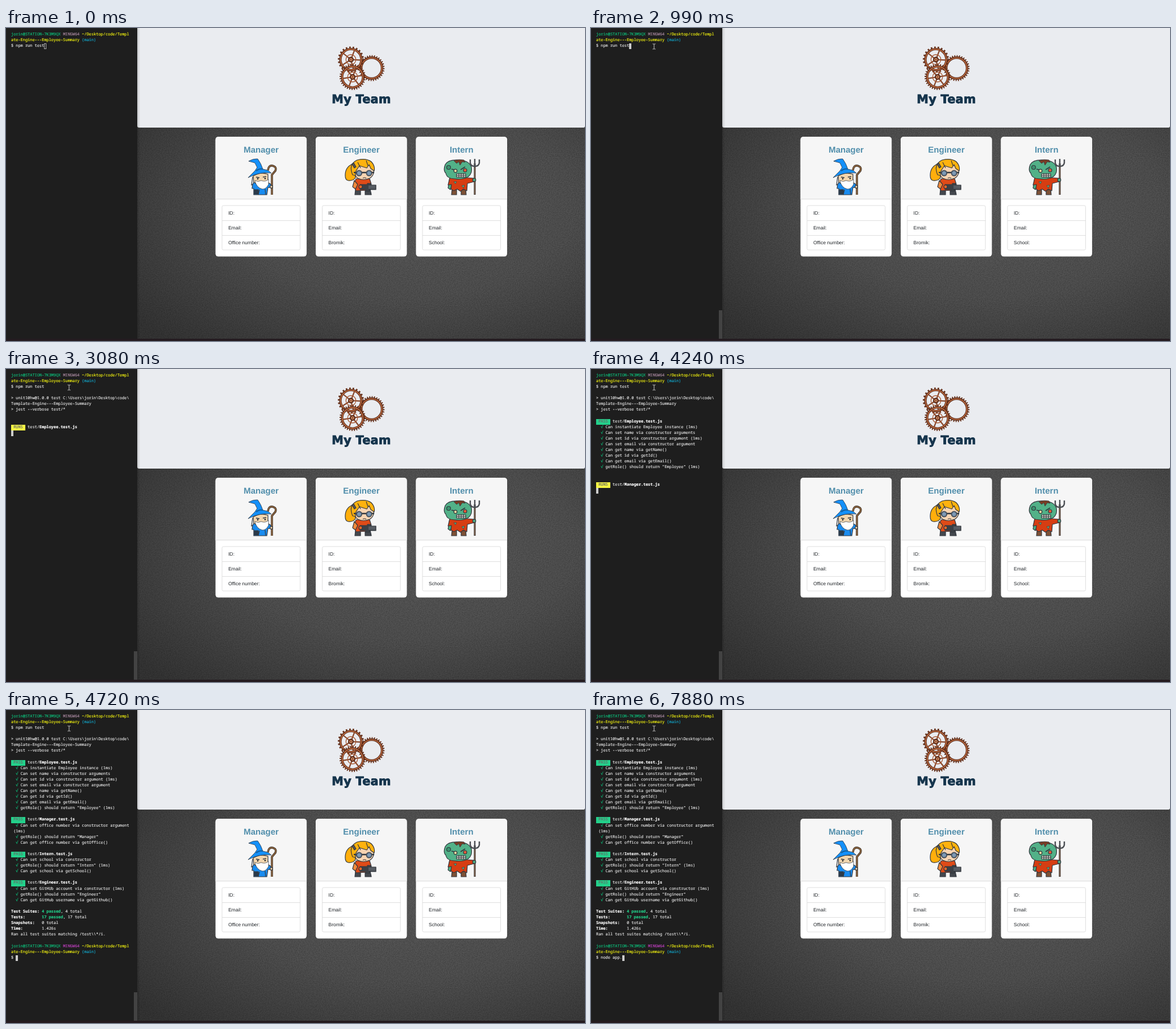
An HTML page that plays this animation: 1019x550 px, repeating every 8 s.

```html
<!DOCTYPE html>
<html lang="en">
<head>
<meta charset="utf-8">
<title>My Team</title>
<style>
html, body { margin: 0; width: 100%; height: 100%; overflow: hidden; background: #1e1e1e; }
svg { position: absolute; left: 0; top: 0; text-rendering: geometricPrecision; }
pre {
  position: absolute; left: 9px; top: 6.75px; margin: 0; color: #e2e2e2;
  font: 6.933px/10.1px "Noto Sans Mono", monospace; font-variant-ligatures: none;
  text-rendering: geometricPrecision; -webkit-text-stroke: .18px;
}
pre b { color: #fff; }
.badge { display: inline-block; vertical-align: top; height: 10.1px; color: #666; }
.caret {
  display: inline-block; vertical-align: top; width: 4.16px; height: 10.1px;
  margin-right: -4.16px; background: #ccc;
}
.caret.hollow { background: none; box-shadow: inset 0 0 0 .8px #ccc; }
.sans { font-family: "Liberation Sans", Arial, sans-serif; }
</style>
</head>
<body>
<svg width="1019" height="550" viewBox="0 0 1019 550">
  <defs>
    <radialGradient id="slate" gradientUnits="userSpaceOnUse" cx="0" cy="0" r="1"
      gradientTransform="translate(700 310) scale(600 330)">
      <stop offset="0" stop-color="#5e5e5e"/>
      <stop offset=".5" stop-color="#535353"/>
      <stop offset="1" stop-color="#363636"/>
    </radialGradient>
    <linearGradient id="edge">
      <stop offset="0" stop-opacity=".16"/>
      <stop offset="1" stop-opacity="0"/>
    </linearGradient>
    <filter id="grain" x="0" y="0" width="1" height="1">
      <feTurbulence type="fractalNoise" baseFrequency=".55" numOctaves="2" seed="4"/>
      <feColorMatrix values="0 0 0 0 0  0 0 0 0 0  0 0 0 0 0  .4 0 0 0 -.1"/>
    </filter>
  </defs>
  <rect width="231" height="550" fill="#1e1e1e"/>
  <rect x="231" width="788" height="550" fill="url(#slate)"/>
  <rect x="231" y="170" width="788" height="380" filter="url(#grain)"/>
  <rect x="231" y="-5" width="788" height="180" rx="3" fill="#eaecf0"/>
  <rect x="231" width="5" height="550" fill="url(#edge)"/>
  <g id="gears" fill="none"></g>
  <text x="625.5" y="132" text-anchor="middle" font-family="DejaVu Sans, sans-serif" font-weight="bold"
    font-size="20.7" letter-spacing=".3" fill="#15344c" stroke="#15344c" stroke-width=".9">My Team</text>
  <g id="cards" class="sans"></g>

  <g stroke="#33383f" stroke-width="1.2" stroke-linejoin="round">
    <!-- wizard -->
    <path d="M434 262l-2 14 5-3 1-10z" fill="#eee"/>
    <path d="M437 270l22 0 9 6 0 5-7-1-2 13-23 0 0-11-3 0 1-7z" fill="#1a8cf0"/>
    <path d="M435 260q13-8 26-3l0 14q-12 8-25 0z" fill="#f3d6ae"/>
    <path d="M438 268q6 3 11 0 7 3 13-2l0 9q-5 9-11 8-10-2-13-15z" fill="#fff" stroke-width=".7"/>
    <path d="M437 284h7v8h-7zM446 284l-2 9M456 283l1 10" fill="#2a3a4a"/>
    <path d="M426 263l12-12 4-6-4-8-11-3q9-5 16-4 6 8 9 18l9 2 6 5q-20-3-41 8z" fill="#1490fa" stroke-width=".8"/>
    <path d="M440 251q7-5 12-3" fill="none" stroke="#135e9c" stroke-width="2"/>
    <path d="M440 262l6 1M452 262l6-1" stroke-width="1.4"/>
    <g fill="#333" stroke="none"><circle cx="443" cy="265" r="1.4"/><circle cx="456" cy="264.500" r="1.4"/></g>
    <path d="M461 250q1-9 8-8 8 2 5 9l-6 7v35" fill="none" stroke="#3b3129" stroke-width="3.6"/>
    <path d="M461 250q1-9 8-8 8 2 5 9l-6 7v35" fill="none" stroke="#94683e" stroke-width="1.8"/>
    <circle cx="467" cy="279" r="2.300" fill="#f3d6ae"/>

    <!-- engineer -->
    <path d="M612 238q-15 5-15 21 0 8 5 9 9 1 13-5z" fill="#ffae0c"/>
    <path d="M615 284h9v9h-10zM632 284h9l2 9h-11z" fill="#44484e"/>
    <path d="M616 265h24l3 10-4 10-23 1-4-10z" fill="#df4b18"/>
    <path d="M613 268l-3 11 5 4 4-8z" fill="#f08a3c"/>
    <path d="M613 246q18-12 34 0 2 13-7 18-11 5-21 0-8-6-6-18z" fill="#f7d4b2"/>
    <path d="M610 258q-8-19 8-26 16-4 25 3 7 8 5 16l-6-4-3-7-4 6-13-4-6 9-1 8z" fill="#ffb20e"/>
    <path d="M619 236l5 10M634 233l3 9" fill="none"/>
    <path d="M612 254h36" stroke-width="2.500"/>
    <g fill="#7c98b4" stroke="#46505c" stroke-width="2">
      <circle cx="621.500" cy="255" r="4.500"/><circle cx="639" cy="255" r="4.500"/></g>
    <path d="M628 264q3-2 6 0" fill="none"/>
    <path d="M609 239l4 7 3-2-4-7z" fill="#555"/>
    <path d="M623 275h13v-2h6v3h9v8h-11l-1 3h-5l-1-3h-10z" fill="#3c4046"/>
    <path d="M638 278h12M638 281h12" stroke="#8a929a"/>
    <circle cx="624" cy="279" r="3" fill="#e9672a"/>

    <!-- zombie -->
    <path d="M785 284h8v9h-9zM801 284h8l1 9h-9z" fill="#7d5136"/>
    <path d="M781 264l-3 17 4 3 4-12z" fill="#50ad84"/>
    <path d="M781 263h30l12 1 1 6-12 3-1 13-6-3-5 4-6-4-6 3-5-3 1-8-6 1z" fill="#d63d12"/>
    <path d="M788 270l3 4 2-4zM802 277l3 4 2-5z" fill="#50ad84" stroke-width=".6"/>
    <path d="M773 240q5-9 23-8 18 0 23 12 2 11-5 17-10 6-24 4-14 0-16-10-5-5-1-15z" fill="#52b188"/>
    <path d="M788 233l5 5 4-3 2 6 4-6 5 1-2-4q-8-2-18 1z" fill="#7a3c24" stroke-width=".8"/>
    <circle cx="779" cy="245" r="3.500" fill="#3d9470"/>
    <path d="M784 248l9 2M800 249l8-5" stroke-width="1.600"/>
    <circle cx="791" cy="251" r="2.800" fill="#e8d8a0"/>
    <circle cx="808" cy="250" r="3" fill="#e55b38"/>
    <path d="M793 256h16v6h-16zM793 259h16M797 255v8M801 255v8M805 255v8" fill="#d9dfd0"/>
    <path d="M825 238v55" stroke="#433d3b" stroke-width="3.200"/>
    <path d="M825 245v47" stroke="#80604a" stroke-width="1.400"/>
    <path d="M817 231v6q1 6 8 6t8-6v-6M825 230v14" fill="none" stroke="#4b4e53" stroke-width="2.400"/>
    <circle cx="824" cy="267" r="2.800" fill="#50ad84"/>
  </g>

  <rect id="bar" x="225" y="496" width="6" height="54" fill="#434343"/>
  <rect y="546" width="1019" height="4" fill="#241b20"/>
</svg>
<pre id="term"></pre>
<svg width="1019" height="550">
  <g id="mouse">
    <path id="arrow" d="M0 0v10l2.300-2 1.700 3.500 1.500-.7-1.500-3.300h3z" fill="#fff" stroke="#000" stroke-width=".6"/>
    <path id="beam" d="M-2.500-4.500h2l.5.500.5-.5h2M0-4v8M-2.500 4.500h2l.5-.5.5.5h2" fill="none" stroke="#ddd" stroke-width=".9"/>
  </g>
</svg>
<script>
const $ = id => document.getElementById(id);

// Page artwork
function gear(x, y, r, teeth, spokes) {
  const ring = (radius, width, color, extra = '') =>
    `<circle cx="${x}" cy="${y}" r="${radius}" stroke="${color}" stroke-width="${width}" ${extra}/>`;
  let s = ring(r - 1.5, 3, '#69331d', `pathLength="${2 * teeth}" stroke-dasharray=".9 1.1"`)
    + ring(r - 4.5, 4.2, '#572917') + ring(r - 4.7, 1.9, '#b9683f');
  for (let i = 0; i < spokes; i++) {
    const a = 2 * Math.PI * i / spokes - 1.2;
    s += `<path d="M${x} ${y}l${(r - 6) * Math.cos(a)} ${(r - 6) * Math.sin(a)}" stroke="#87462a" stroke-width="2.2"/>`;
  }
  if (spokes) s += ring(r * .38, 1.3, '#a85a35') + ring(3, 4, '#5a2b19') + ring(2, 1.5, '#d49067');
  return s;
}
$('gears').innerHTML = gear(643.5, 70.5, 22.8, 32, 0) + gear(607, 55.5, 23, 22, 5) + gear(610, 86, 23, 32, 6);

function card(x, title, lastLabel) {
  const row = (label, i) => `<text x="${x + 22.5}" y="${328 + 26.2 * i}" font-size="8.5" fill="#212529">${label}</text>`;
  return `<rect x="${x}" y="191.300" width="160.400" height="210.300" rx="5" fill="#fff"/>
    <path d="M${x} 301v-104.700q0-5 5-5h150.400q5 0 5 5v104.700z" fill="#f6f6f6"/>
    <path d="M${x} 300.700h160.400" stroke="#dcdcdc"/>
    <text x="${x + 80.3}" y="219" text-anchor="middle" font-size="15" font-weight="bold" fill="#528fac">${title}</text>
    <path d="M${x + 11.4} 338.500h138M${x + 11.4} 364.500h138" stroke="#dfdfdf"/>
    <rect x="${x + 11.5}" y="312" width="137.500" height="78" rx="2.500" fill="none" stroke="#dcdcdc" stroke-width=".9"/>`
    + ['ID:', 'Email:', lastLabel].map(row).join('');
}
$('cards').innerHTML = card(368.7, 'Manager', 'Office number:')
  + card(545.1, 'Engineer', 'Bromik:') + card(721.5, 'Intern', 'School:');

// Terminal output
const paint = (color, s) => `<span style="color:${color}">${s}</span>`;
const prompt = shell => paint('#0dbc79', 'jorin@STATION-7K3M9QX') + ' ' + paint(shell, 'MINGW64') + ' '
  + paint('#f2f210', '~/Desktop/code/Templ\nate-Engine---Employee-Summary') + ' ' + paint('#11a8cd', '(main)') + '\n$ ';
const badge = (color, word, name) =>
  `<span class="badge" style="background:${color}"> ${word} </span> test/<b>${name}.test.js</b>\n`;
const runs = name => '\n' + badge('#f5f543', 'RUNS', name);
const suite = (name, ...tests) => badge('#23d18b', 'PASS', name)
  + tests.map(s => '  ' + paint('#0dbc79', '√') + ' ' + s + '\n').join('') + '\n';
const passed = n => `<b style="color:#23d18b">${n} passed</b>, ${n} total\n`;

const start = prompt('#a8889f') + 'npm run test';
const launched = start + '\n\n&gt; unit10hw@1.0.0 test C:\\Users\\jorin\\Desktop\\code\\\n'
  + 'Template-Engine---Employee-Summary\n&gt; jest --verbose test/*\n\n';
const employee = launched + suite('Employee', 'Can instantiate Employee instance (1ms)',
  'Can set name via constructor arguments', 'Can set id via constructor argument (1ms)',
  'Can set email via constructor argument', 'Can get name via getName()', 'Can get id via getId()',
  'Can get email via getEmail()', 'getRole() should return "Employee" (1ms)');
const manager = employee + suite('Manager', 'Can set office number via constructor argument\n (1ms)',
  'getRole() should return "Manager"', 'Can get office number via getOffice()');
const intern = manager + suite('Intern', 'Can set school via constructor',
  'getRole() should return "Intern" (1ms)', 'Can get school via getSchool()');
const done = intern + suite('Engineer', 'Can set GitHUb account via constructor (1ms)',
  'getRole() should return "Engineer"', 'Can get GitHub username via getGithub()')
  + '<b>Test Suites:</b> ' + passed(4) + '<b>Tests:</b>       ' + passed(17)
  + '<b>Snapshots:</b>   0 total\n<b>Time:</b>        1.426s\nRan all test suites matching /test\\\\*/i.\n';

const screens = [
  [0, start], [1920, start + '\n'], [2470, launched],
  [3000, launched + 'Determining test suites to run...'], [3080, launched + runs('Employee')],
  [4240, employee + runs('Manager')], [4330, manager + runs('Intern')],
  [4400, intern + runs('Engineer')], [4470, done], [4720, done + '\n' + prompt('#bc3fbc')],
];
const keys = [6260, 6410, 6490, 6720, 6800, 7410, 7580, 7730, 7880];

function pointer(t) {
  if (t >= 990) return [111, 32.5];
  const k = Math.min(9, Math.floor((t - 130) / 76.6)) / 9;
  const e = k * k * (3 - 2 * k);
  return [985 - 880 * e, 330 - 301 * e];
}

let shown;
function draw(now) {
  const t = now % 8000;
  const screen = screens.filter(s => s[0] <= t).pop()[1];
  const typed = 'node app.'.slice(0, keys.filter(k => k <= t).length);
  const html = screen + typed + `<i class="caret${t < 819 ? ' hollow' : ''}"></i>`;
  if (html !== shown) $('term').innerHTML = shown = html;

  const [x, y] = pointer(t), visible = t >= 130, inside = visible && x < 231;
  const show = (id, on) => $(id).setAttribute('visibility', on ? 'visible' : 'hidden');
  $('mouse').setAttribute('transform', `translate(${x} ${y})`);
  show('arrow', visible && !inside);
  show('beam', inside);
  show('bar', inside);
  requestAnimationFrame(draw);
}
draw(0);
</script>
</body>
</html>
```
